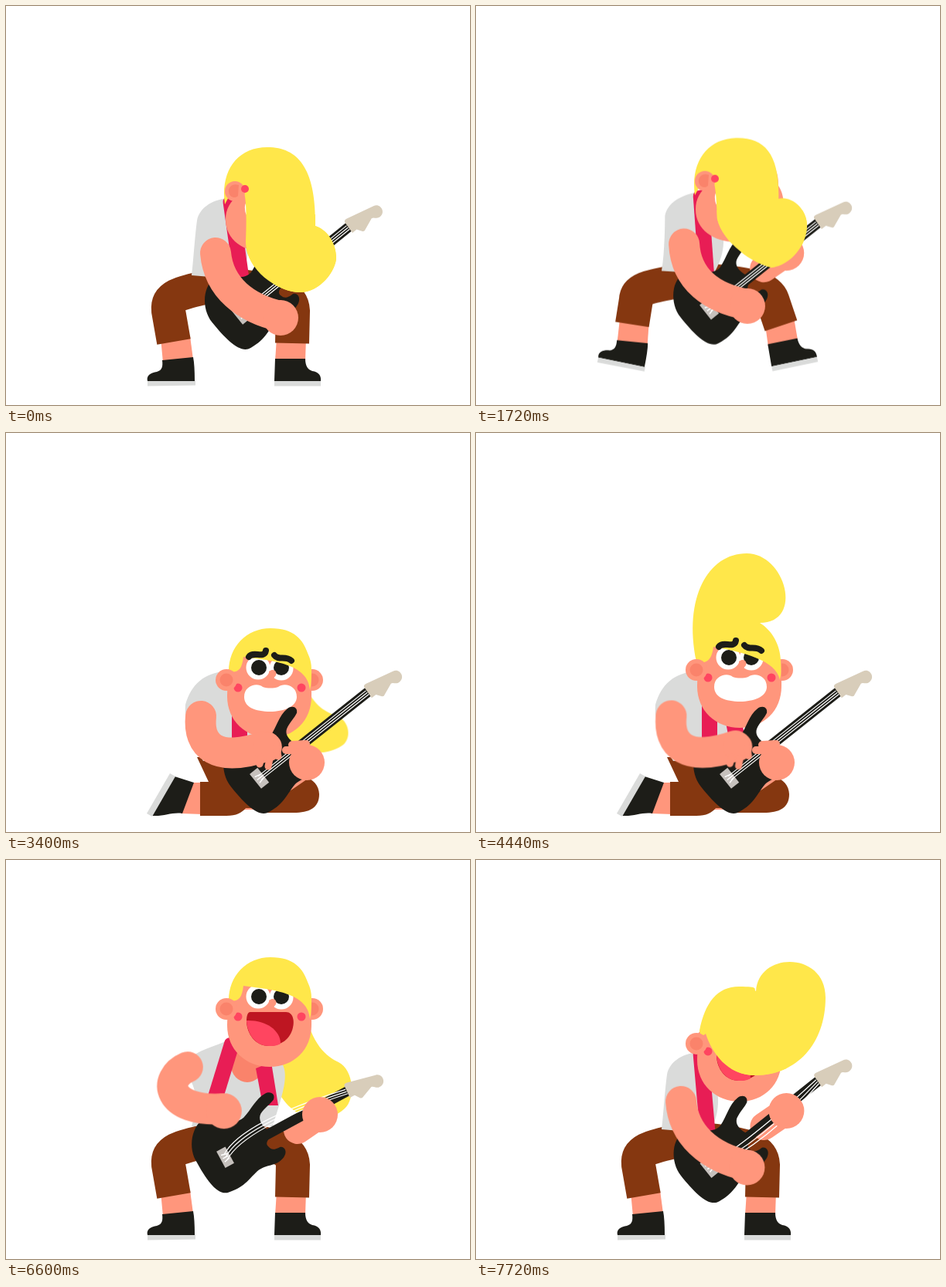
An HTML page without scripts that plays this animation: 600 px wide and 517 px high, repeating every 7.76 s.

```html
<!DOCTYPE html>
<html lang="en">
<head>
<meta charset="utf-8">
<title>Guitar solo</title>
<style>
/* The pose is driven by a few dials, each from 0 to 1 (bob is in px). */
@property --up { syntax: "<number>"; inherits: true; initial-value: 0; }
@property --knee { syntax: "<number>"; inherits: true; initial-value: 0; }
@property --sing { syntax: "<number>"; inherits: true; initial-value: 0; }
@property --air { syntax: "<number>"; inherits: true; initial-value: 0; }
@property --bob { syntax: "<number>"; inherits: true; initial-value: 0; }

html, body { margin: 0; width: 100%; height: 100%; overflow: hidden; background: #fff; }
svg {
  display: block; width: 100vw; height: 100vh;
  animation: 7760ms ease-in-out infinite;
  animation-name: up, knee, sing, air, bob;
}
svg * { animation: 7760ms ease-in-out infinite; }

@keyframes up {
  0%, 8.25%, 16.5%, 21%, 29.4%, 32%, 100% { --up: 0 }
  4.12%, 12.37%, 25.3%, 36%, 96.4% { --up: 1 }
  99.485% { --up: .12 }
}
@keyframes knee {
  0%, 25.3%, 77.3%, 100% { --knee: 0 }
  29.4%, 73.2% { --knee: 1 }
}
@keyframes sing {
  0%, 73.2%, 96.4%, 100% { --sing: 0 }
  78%, 94% { --sing: 1 }
}
@keyframes air {
  0%, 21%, 81.5%, 100% { --air: 0 }
  25.3%, 28.9% { --air: 1 }
  74.2%, 77.3% { --air: .45 }
}
@keyframes bob {
  0%, 31%, 62.5%, 77.3%, 85.05%, 99.485%, 100% { --bob: 0 }
  33%, 40%, 48%, 66%, 88%, 94% { --bob: 9 }
  36%, 44%, 52%, 73.2% { --bob: 2 }
  54% { --bob: 13 }
  57.2%, 69.6% { --bob: -11 }
  91% { --bob: -4 }
  96.4% { --bob: -29 }
}

.skin { fill: #ff967c; }
.shade { fill: #fa836b; }
.hair { fill: #ffe74a; }
.brown { fill: #853710; }
.ink { fill: #1d1d18; }
.grey { fill: #dadbda; }
.red { fill: #e81d55; }
.pink { fill: #ff4560; }
.white { fill: #fff; }
.line { fill: none; stroke: #ff967c; stroke-width: 40; stroke-linecap: round; }
.thigh { fill: none; stroke: #853710; stroke-width: 44; }
.brow { fill: none; stroke: #1d1d18; stroke-width: 8; stroke-linecap: round; stroke-linejoin: round; }

/* hard switches */
.turned, .front { animation-timing-function: step-end; }
.turned { animation-name: turned; }
.front { animation-name: front; }
@keyframes turned { 35%, 100% { visibility: hidden } }
@keyframes front { 0% { visibility: hidden } 35%, 100% { visibility: visible } }
.stand { opacity: calc((.85 - var(--knee)) * 999); }
.kneel { opacity: calc((var(--knee) - .85) * 999); }
.solo { opacity: calc((var(--knee) + var(--up) - 1.5) * 999); }
.open { opacity: calc((.5 - var(--knee)) * 999); }
.chest { opacity: calc((var(--up) - var(--knee) - .5) * 999); }
.over { opacity: calc((.8 - var(--up) - var(--knee)) * 999); }

.hop { animation-name: hop; }
@keyframes hop {
  21%, 29.2%, 73.2%, 81.5% { transform: none }
  25.3% { transform: translateY(-34px) }
  77.3% { transform: translateY(-47px) }
}
.head { transform: translateY(calc(1px * (51 * (1 - var(--up)) * (1 - var(--knee)) + 125 * var(--knee) + var(--bob)))); }

.strap {
  --both: calc(var(--up) * var(--knee));
  transform:
    translate(calc(1px * (290 + 3 * var(--up) + 8 * var(--knee) + var(--both))),
              calc(1px * (250 - 15 * var(--up) + 95 * var(--knee) + 10 * var(--both))))
    rotate(calc(1deg * (25 * var(--up) + 35 * var(--knee) - 52 * var(--both) - 8)));
}
.strap2 {
  opacity: calc((var(--up) - .3) * 999);
  transform: translateY(calc(105px * var(--knee)));
}
.guitar {
  --both: calc(var(--up) * var(--knee));
  transform:
    translate(calc(1px * (304 - 13 * var(--up) - 31 * var(--knee) + 68 * var(--both) - 7 * var(--sing))),
              calc(1px * (399 - 7 * var(--up) + 54 * var(--knee) + var(--both) - 7 * var(--sing))))
    rotate(calc(1deg * (3.5 * var(--up) + 26 * var(--knee) - 29 * var(--both) + 7 * var(--sing) - 39)));
}
.hand {
  --both: calc(var(--up) * var(--knee));
  transform:
    translate(calc(1px * (355 - 39 * var(--up) - 40 * var(--knee) + 62 * var(--both) - 36 * var(--sing))),
              calc(1px * (404 - 45 * var(--up) + 58 * var(--knee) - 10 * var(--both) - 31 * var(--sing))))
    scale(calc(1 - .32 * var(--knee) + .14 * var(--both)));
}
.far {
  --both: calc(var(--up) * var(--knee));
  transform:
    translate(calc(1px * (402 - 5 * var(--up) - 4 * var(--knee) - 4 * var(--both) + 9 * var(--sing))),
              calc(1px * (324 + 8 * var(--up) + 108 * var(--knee) - 13 * var(--both) - 2 * var(--sing))));
}
.footL {
  transform-origin: 218px 435px;
  transform: translate(calc(-98px * var(--air)), calc(-110px * var(--air))) rotate(calc(75deg * var(--air)));
}
.footR {
  transform-origin: 369px 436px;
  transform: translate(calc(158px * var(--air)), calc(-111px * var(--air))) rotate(calc(-75deg * var(--air)));
}

.tap { animation-name: tap; }
@keyframes tap {
  0%, 8.25%, 16.5%, 100% { transform: none }
  4.12%, 12.37% { transform: translateY(-12px) }
}
.strum { animation: strum 485ms ease-in-out infinite; }
@keyframes strum { 50% { transform: translate(2px, -3px) } }

/* soft shapes */
.thighL { d: path("M265 363C225 372 208 375 210 395L217 435"); animation-name: thighL; }
.thighR { d: path("M300 363C350 368 370 375 371 395L370 437"); animation-name: thighR; }
@keyframes thighL {
  21%, 81.5% { d: path("M265 363C225 372 208 375 210 395L217 435") }
  25.3%, 28.9% { d: path("M270 350C235 350 205 345 190 340L120 325") }
  74.2%, 77.3% { d: path("M267 357C230 362 207 361 201 370L173 385") }
}
@keyframes thighR {
  21%, 81.5% { d: path("M300 363C350 368 370 375 371 395L370 437") }
  25.3%, 28.9% { d: path("M310 350C370 350 420 345 450 340L527 325") }
  74.2%, 77.3% { d: path("M304 357C359 358 392 359 406 370L440 387") }
}
.mane { animation-name: mane; }
@keyframes mane {
  0%, 8.25%, 16.5%, 21%, 100% { d: path("M283 206C277 164 298 132 338 132S401 160 400 234C418 240 427 259 427 275S407 320 380 320C353 320 310 292 310 254C313 180 306 160 283 206Z") }
  4.12%, 12.37%, 25.3% { d: path("M283 215C278 165 305 147 325 140S348 118 344 92C344 32 434 32 434 95S418 176 393 200C390 165 368 146 322 151C295 170 300 195 283 215Z") }
  29.4%, 33% { d: path("M283 205C277 160 298 130 338 130S398 165 400 215C403 235 386 268 395 288S375 337 350 337C318 337 300 312 300 275C309 235 322 160 283 205Z") }
  36%, 53%, 62.5%, 94% { d: path("M288 182C288 150 311 126 342 126S384 141 390 158C394 167 395 172 395 180S395 198 393 206C391 172 345 168 307 163C305 180 300 184 288 182Z") }
  57.2%, 96.4% { d: path("M285 182C268 100 300 42 350 42S425 132 367 132C383 142 393 160 394 180S394 200 393 206C388 180 345 170 307 163C305 180 298 186 285 182Z") }
  99.485% { d: path("M289 176C296 140 312 119 340 119S358 122 362 125C365 73 452 73 452 133S415 234 361 234C325 234 305 205 297 180C292 185 290 182 289 176Z") }
}
.tail { transform-origin: 378px 195px; animation-name: tail; }
@keyframes tail {
  0%, 34%, 54%, 58%, 96%, 100% { transform: scale(.1, .2) }
  37%, 47%, 69%, 73.2% { transform: scale(.12, .54) }
  42%, 51%, 63%, 77.3% { transform: scale(1.25, .7) }
  85.05%, 93% { transform: none }
}
.shirt { animation-name: shirt; }
@keyframes shirt {
  0%, 8.25%, 16.5%, 21%, 99.485%, 100% { d: path("M240 349C242 335 244 300 247 278C250 262 265 252 285 249L312 300C315 315 312 340 300 354Z") }
  4.12%, 12.37%, 25.3%, 78%, 96.4% { d: path("M240 345C250 312 246 292 230 272C238 246 262 246 290 232L340 250C372 264 362 290 345 345Z") }
  29.4%, 33% { d: path("M258 415C245 400 230 375 231 355C245 325 262 310 285 306L305 360C305 375 303 390 300 415Z") }
  36%, 73.2% { d: path("M255 425C240 400 230 375 232 352C240 325 255 312 285 308L335 370C345 380 345 395 330 425Z") }
}
.strings { animation-name: strings; }
@keyframes strings {
  0%, 78%, 91%, 100% { d: path("M0-3Q60-3 178-3M0 0Q60 0 178 0M0 3Q60 3 178 3") }
  85.05%, 87% { d: path("M0-4Q40-30 178-3M0 0Q40-26 178 0M0 4Q40-22 178 3") }
  99.485% { d: path("M0-3Q60 6 178-3M0 0Q70 16 178 0M0 3Q80 22 178 3") }
}
.arm { animation-name: arm; }
@keyframes arm {
  0%, 8.25%, 16.5%, 21%, 100% { d: path("M271 320C275 365 310 392 355 402") }
  4.12%, 12.37%, 25.3%, 96.4% { d: path("M246 298C240 350 270 359 315 357") }
  29.4%, 32% { d: path("M248 367C240 420 268 450 312 456") }
  36%, 73.2% { d: path("M252 367C248 405 272 428 335 406") }
  78%, 94% { d: path("M233 271C200 285 205 330 280 325") }
  99.485% { d: path("M265 313C268 355 300 385 350 396") }
}
</style>
</head>
<body>
<svg viewBox="0 0 600 517">
  <defs>
    <clipPath id="low"><rect x="311" y="270" width="289" height="247"/></clipPath>
  </defs>
  <g class="hop">
    <g class="head">
      <path class="hair tail" d="M385 190C395 240 415 255 430 262C450 272 452 310 438 322C410 348 370 335 352 300C360 260 350 230 340 200Z"/>
    </g>

    <g class="stand">
      <g class="tap">
        <g class="footL">
          <path class="skin" d="M200 430L238 428L242 458L203 462Z"/>
          <path class="ink" d="M202 459L242 455Q244 465 244 486H183C181 478 188 475 195 474C202 472 203 467 202 459Z"/>
          <path class="grey" d="M183 486H245V491.500L183 492.500Z"/>
        </g>
        <path class="thigh thighL"/>
      </g>
      <g class="footR">
        <path class="skin" d="M350 430H388L387 460H348Z"/>
        <path class="ink" d="M348 457H387C387 466 390 471 396 473C404 474 408 479 407 486H347Z"/>
        <path class="grey" d="M347 486H407V492.500H347Z"/>
      </g>
      <path class="thigh thighR"/>
    </g>
    <g class="kneel">
      <path class="skin" d="M226 493L242 453H254V494ZM308 482h20v6h-20Z"/>
      <path class="ink" d="M189 496L218 445L243 453L228 493C215 491 205 497 189 496Z"/>
      <path class="grey" d="M182 493L212 441L219 445L189 497Z"/>
      <path class="brown" d="M247 420H330C375 440 405 445 405 468C405 486 392 492 372 492H327V486H310C305 492 298 496 285 496H251V452H262Z"/>
    </g>

    <path class="grey shirt"/>
    <ellipse class="shade chest" cx="312" cy="266" rx="21" ry="22"/>
    <path class="red strap" d="M-10 4Q-10-4 0-4H10V108H-10Z"/>
    <path class="red strap2" d="M323 270L343 262L352 318L332 318Z"/>
    <g class="far"><path class="line" style="stroke-width:36" d="M-29 20L0 0"/></g>

    <g class="head">
      <g class="turned">
        <path class="skin" d="M284 226C284 252 308 268 335 268H350C380 268 398 248 398 225C398 210 396 203 391 195C392 165 372 150 345 150H318C300 165 300 180 300 195C290 202 284 212 284 226Z"/>
        <circle class="white" cx="331" cy="167" r="17.500"/>
        <circle class="white" cx="364" cy="168" r="17.500"/>
        <path class="skin" d="M346 167C356 165 360 172 355 178C351 181 348 183 344 182Z"/>
        <path class="brow" style="stroke-width:4.500" d="M327 155L338 160L327 165M370 155L359 160L370 164"/>
        <path class="white" d="M309 212C308 200 318 197 327 196C340 192 360 192 370 196C385 198 391 203 391 213C391 225 380 229 372 226C358 221 342 220 332 225C320 229 309 224 309 212Z"/>
      </g>
      <g class="front">
        <circle class="skin" cx="396" cy="193" r="14"/>
        <circle class="shade" cx="396" cy="193" r="8.500"/>
        <path class="skin" d="M287 180L286 214C286 246 310 268 341 268C372 268 395 246 395 214V184L368 160H304Z"/>
        <circle class="white" cx="326" cy="177" r="15.500"/>
        <circle class="white" cx="356" cy="178" r="15.500"/>
        <circle class="ink" cx="327" cy="177" r="10"/>
        <circle class="ink" cx="356" cy="177" r="10"/>
        <path class="skin" d="M340 182C346 177 351 182 349 187C347 190 345 192 340 193Z"/>
        <circle class="pink" cx="300" cy="203" r="5.500"/>
        <circle class="pink" cx="382" cy="203" r="5.500"/>
        <path class="white solo" d="M308 215C308 200 325 196 332 202C338 204 346 204 352 202C360 196 376 200 376 215C376 228 358 234 342 234C322 234 308 228 308 215Z"/>
        <g class="open">
          <path fill="#be1622" d="M316 197H362C372 197 373 210 371 217C368 232 355 241 340 241C322 241 312 225 311 210C311 203 312 197 316 197Z"/>
          <path class="pink" d="M311 208C335 207 355 220 355 238C350 241 345 241 340 241C322 241 312 225 311 208Z"/>
        </g>
      </g>
      <path class="hair mane"/>
      <g class="turned">
        <circle class="skin" cx="296" cy="189" r="13"/>
        <path class="shade" d="M301 181C293 178 287 184 288 190C289 197 296 199 300 195Z"/>
        <circle class="pink" cx="309" cy="186" r="5"/>
      </g>
      <g class="front">
        <circle class="skin" cx="285" cy="193" r="14"/>
        <circle class="shade" cx="285" cy="193" r="8.500"/>
        <path class="brow solo" d="M314 163C320 155 334 166 336 155M347 161C352 168 362 161 369 168"/>
      </g>
    </g>

    <g class="guitar">
      <path class="ink" d="M64-6C60-16 61-24 67-28C75-32 84-33 90-36C96-41 92-48 84-48C70-48 58-38 45-34C30-30 22-48 5-56C-14-62-36-38-36-15C-36 15-33 40-18 42C5 46 15 38 30 35C45 34 52 42 66 36C74 32 74 24 68 22C60 22 56 20 55 14C54 10 56 8 60 6Z"/>
      <path class="ink" d="M50-6.500H180V6.500H50Z"/>
      <path fill="#c6c1bd" d="M-7-12H6V12H-7Z"/>
      <path class="strings" fill="none" stroke="#fff" stroke-width="1.200"/>
      <path fill="none" stroke="#fff" stroke-width="1.500" d="M-4-5L4-3M-4 0H4M-4 5L4 3"/>
      <path fill="#d8cdba" d="M179-8Q180-11 184-10L221-1C231 1 229 17 217 15C213 14 212 10 209 10L194 16Q191 18 189 15L185 9H178Z"/>
    </g>
    <g class="far"><circle class="skin" r="23"/></g>
    <path class="line solo" style="stroke-width:10" d="M362 411H374M370 404L388 403"/>

    <g clip-path="url(#low)"><g class="over"><g class="head"><path class="hair mane"/></g></g></g>

    <g class="strum">
      <path class="line arm"/>
      <g class="hand"><circle class="skin" r="23"/></g>
      <path class="line solo" style="stroke-width:9" d="M330 420L328 429M341 422L339 432M350 408L352 419"/>
    </g>
  </g>
</svg>
</body>
</html>
```
